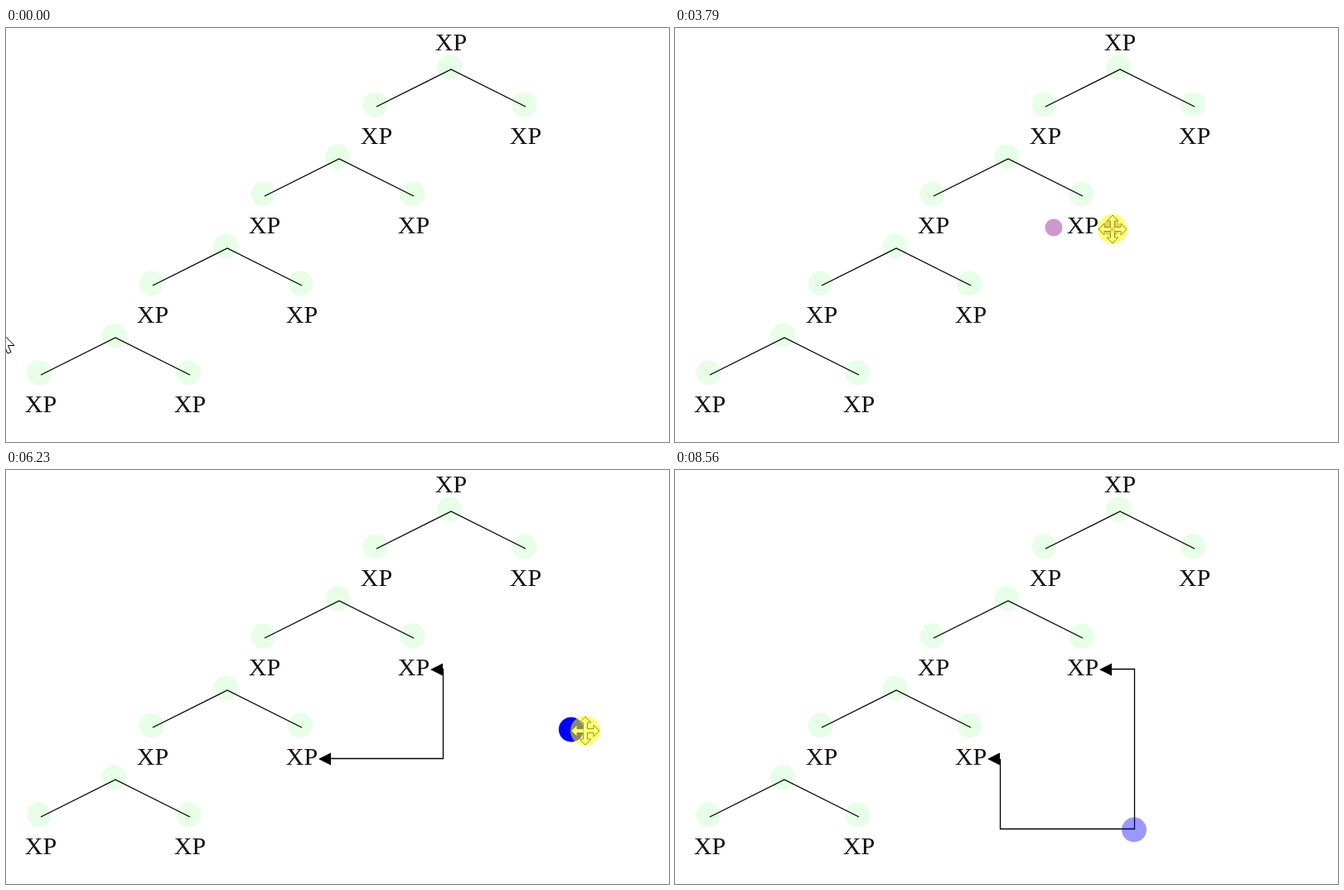
An HTML page for the animation above (8.63 s loop, 800 by 500 pixels).

```html
<!DOCTYPE html>
<html lang="en">
<head>
<meta charset="utf-8">
<title>Connecting tree nodes</title>
<style>
html, body { margin: 0; width: 100%; height: 100%; overflow: hidden; background: #fff; }
svg { display: block; width: 800px; height: 500px; }
text { font: 30px "Liberation Serif", "Times New Roman", serif; text-anchor: middle; fill: #111; }
</style>
</head>
<body>
<svg id="stage" viewBox="0 0 800 500"></svg>
<script>
const LOOP = 8630;
const stage = document.getElementById('stage');

function set(el, attrs) {
  for (const name in attrs) el.setAttribute(name, attrs[name]);
}
function add(tag, attrs, text = '') {
  const el = document.createElementNS('http://www.w3.org/2000/svg', tag);
  set(el, attrs);
  el.textContent = text;
  return stage.appendChild(el);
}
const show = (el, on) => set(el, { visibility: on ? 'visible' : 'hidden' });
const place = (el, x, y) => set(el, { transform: `translate(${x} ${y})` });
const label = (x, y) => add('text', { x, y }, 'XP');
const line = d => add('path', { d, fill: 'none', stroke: '#000', 'stroke-width': 1.3 });
const active = (t, s) => t >= s.from && t < s.to;

// Four branches stepping down to the left
for (let i = 0; i < 4; i++) {
  const x = 537 - 135 * i, y = 50 + 108 * i;
  for (const side of [-1, 0, 1])
    add('circle', { cx: x + 90 * side - 1.5, cy: y + 45 * Math.abs(side) - 2.5, r: 15, fill: '#e6ffe6' });
  line(`M${x - 90} ${y + 45}L${x} ${y}L${x + 90} ${y + 45}`);
  for (const side of [-90, 90]) label(x + side, y + 90);
}
label(537, 27);

// The two joined labels: each shows a dot on either side while hovered
const ends = [
  { x: 357, y: 349, from: 800, to: 1800 },
  { x: 492, y: 241, from: 2900, to: 4200 }
];
const dots = ends.flatMap(e => [-1, 1].map(side => ({
  from: e.from,
  to: e.to + (side > 0 ? 500 : 0),
  el: add('circle', { cx: e.x + 35 * side, cy: e.y, r: 10.5, fill: '#cc99cc' })
})));

const link = line('');
const heads = ends.map(e => add('path', { d: `M${e.x + 20} ${e.y}l15 -7.5v15z` }));
const handle = add('circle', { r: 15, fill: '#00f' });

const arrow = add('path', { d: 'M0 0V24L5.5 19L9 27L13 25.5L9.5 17.5H17Z', fill: '#fff', stroke: '#000' });
const cross = add('g', { fill: '#fff', stroke: '#222' });
cross.innerHTML = [0, 90, 180, 270].map(a =>
  `<path transform="rotate(${a})" d="M-2.5-2.5V-10H-7L0-17L7-10H2.5V-2.5"/>`).join('');
const glow = add('circle', { r: 18, fill: '#ff0', opacity: 0.53 });

// Pointer strokes; each starts where the previous one ended
const moves = [
  { from: 20, to: 870, x: 395, y: 348, bendY: 24 },
  { from: 1640, to: 2490, x: 569, y: 272, bendX: -48, bendY: 68 },
  { from: 2520, to: 3170, x: 528, y: 238 },
  { from: 4190, to: 5010, x: 532, y: 349, bendX: 18, bendY: 45 },
  { from: 5560, to: 6230, x: 699, y: 310 },
  { from: 6550, to: 6770, x: 694, y: 342 },
  { from: 6960, to: 7560, x: 549, y: 432 },
  { from: 8080, to: 8560, x: 805, y: 425, bendY: -14 }
];
const clicks = [{ from: 890, to: 1100 }, { from: 3790, to: 3900 }];
const drags = [
  { from: 5080, to: 6550, dx: -9, dy: 1, lag: 90, reroute: 6370, x: 697, y: 349 },
  { from: 6960, to: 7820, dx: 3, dy: 8, lag: 50, reroute: 7720, x: 554, y: 434 }
];

function pointer(t) {
  let x = -7, y = 366;
  for (const m of moves) {
    if (t < m.from) break;
    const u = Math.min(1, (t - m.from) / (m.to - m.from));
    const s = u * u * (3 - 2 * u), arc = Math.sin(Math.PI * s);
    x += (m.x - x) * s + (m.bendX || 0) * arc;
    y += (m.y - y) * s + (m.bendY || 0) * arc;
  }
  return { x, y };
}

function corner(t, key) {
  return drags.reduce((at, d) => t >= d[key] ? d : at, { x: 527, y: 349 });
}

function draw(t) {
  for (const d of dots) show(d.el, active(t, d));

  const linked = t >= 3900;
  for (const el of [link, handle, ...heads]) show(el, linked);
  const bend = corner(t, 'reroute');
  set(link, { d: `M527 240.5H${bend.x + 0.5}V${bend.y - 0.5}H392.5V349` });

  const p = pointer(t);
  const drag = drags.find(d => active(t, d));
  const pulling = drag && t > 5560;
  let knob = corner(t, 'to');
  if (pulling) {
    const late = pointer(t - drag.lag);
    knob = { x: late.x + drag.dx, y: late.y + drag.dy };
  }
  place(handle, knob.x, knob.y + 0.5);
  set(handle, { opacity: pulling ? 1 : 0.4 });

  // The pointer turns into a move cross over anything that can be dragged
  const grips = linked && t > 4300 ? [knob] : ends.map(e => ({ x: e.x + 35, y: e.y }));
  const grabbing = drag || grips.some(g => Math.hypot(g.x - p.x, g.y - p.y) < 15);
  show(arrow, !grabbing);
  show(cross, grabbing);
  show(glow, drag || clicks.some(c => active(t, c)));
  place(arrow, p.x, p.y);
  for (const el of [cross, glow]) place(el, p.x, p.y + 5);
}

const start = performance.now();
function tick() {
  draw((performance.now() - start) % LOOP);
  requestAnimationFrame(tick);
}
tick();
</script>
</body>
</html>
```
